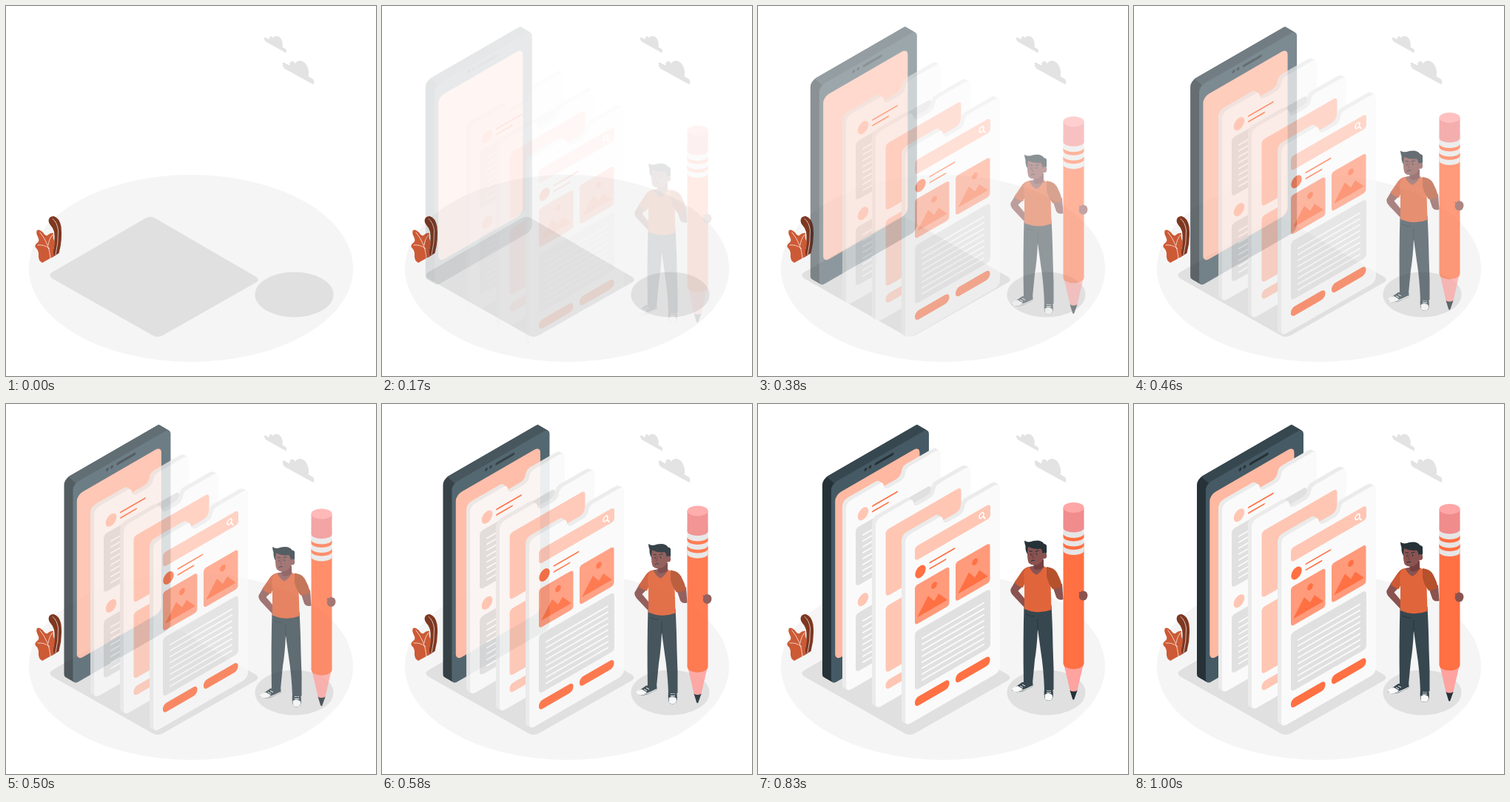
These frames come from a looping animation (500 by 500 pixels, 1.04 s). An HTML page:

```html
<!DOCTYPE html>
<html lang="en">
<head>
<meta charset="utf-8">
<title>Interface prototype</title>
<style>
html, body { margin: 0; width: 100%; height: 100%; overflow: hidden; background: #fff; }
svg { display: block; width: 100vw; height: 100vh; }
</style>
</head>
<body>
<svg viewBox="0 0 500 500">
  <defs>
    <path id="cloud" d="M374 79Q373 75 377 77L383 80.500Q383 74.500 387 74.500Q390 75 391 78Q392 74 398 74Q405 75 408 84Q410 91 408.500 95L415 99Q418 103 415 106L377 85Q374 83 374 79Z" fill="#e3e3e3"/>
  </defs>

  <ellipse cx="250" cy="354.500" rx="219" ry="126.500" fill="#f5f5f5"/>
  <path d="M62 360L189 286.500Q195 283 201 286.500L338 366Q343 370 338 373.500L212 445Q205 449 198 445L62 368Q57 364 62 360Z" fill="#e0e0e0"/>
  <ellipse cx="389.500" cy="390" rx="53" ry="30.500" fill="#e0e0e0"/>
  <use href="#cloud"/>
  <use href="#cloud" transform="translate(83.500 -12) scale(.71)"/>

  <g id="plant" fill="none" stroke="#fff" stroke-width=".7" stroke-linecap="round">
    <path stroke="none" fill="#7f3720" d="M57.500 290Q58 284 64.500 284Q72 286 74.500 298Q76.500 316 71.500 334L62 340Q67 318 65 305Q63 299 60 296Q57.500 293 57.500 290Z"/>
    <path d="M63 287.500Q69 292 70.500 303Q71 320 67 336"/>
    <path stroke="none" fill="#cc5a35" d="M49 347Q43 344 44 335Q44 330 40 326.500Q38 323 43 319.500Q46 317 43 312Q40 306 42 303Q45 301 50 306Q53 311 56 310Q60 306 64 307Q63 313 65 317Q67 321 64.500 327Q63 332 65 338Z"/>
    <path d="M60 341Q59 322 46 306M57 323Q58 315 63 309M59 328Q52 322 43 323"/>
  </g>

  <g id="phone"></g>
  <g id="cards"></g>

  <g id="person">
    <!-- pencil -->
    <path d="M412.500 350L422 391H431L440.500 350Z" fill="#ffa3a0"/>
    <path d="M421.500 389Q426 392 431.500 389L427.500 400.500Q426.300 403 425 400.500Z" fill="#263238"/>
    <path d="M412.500 190V353Q414 358 417 358Q419 359 421 359.500Q426.500 361 432 359.500Q435 359 437 357.500Q440 356 440.500 353V190Z" fill="#ff7043"/>
    <path d="M412.500 160V200A14 6 0 0 0 440.500 200V160Z" fill="#e6e6e6"/>
    <path d="M412.500 177V181.500A14 6 0 0 0 440.500 181.500V177A14 6 0 0 1 412.500 177ZM412.500 188.500V193A14 6 0 0 0 440.500 193V188.500A14 6 0 0 1 412.500 188.500Z" fill="#ff7043"/>
    <path d="M412.500 142V169.500A14 6 0 0 0 440.500 169.500V142Z" fill="#f08c8c"/>
    <ellipse cx="426.500" cy="142" rx="14" ry="7" fill="#ffa6a6"/>

    <!-- shoes and trousers -->
    <path d="M357 378L371 377Q372 382 371 384L358 390Q349 392.500 344 390Q342 387 347 385Z" fill="#37474f"/>
    <path d="M351 383Q343 385 343 388Q345 391 351 390.500Q356 389 358 387Z" fill="#fafafa"/>
    <path d="M344 390Q352 393 371 383" fill="none" stroke="#fafafa" stroke-width="1.200"/>
    <path d="M354 383L358 385M357 381L361 383" stroke="#fff" stroke-width="1"/>
    <path d="M387 386H398Q400 396 397.500 401Q392 405 388 401Q386 396 387 386Z" fill="#37474f"/>
    <path d="M387.500 395Q392 391 397.500 395Q399 400 396 402Q391 404 388 401Z" fill="#fafafa"/>
    <path d="M390 389H396M390 392H396" stroke="#fff" stroke-width="1"/>
    <path d="M359.500 274H396.500Q398 300 398.500 330Q400 360 399.500 388Q394 390 387 388Q386 360 382 335L378 306Q377 330 374 348L371 379Q365 381 359 379Q358 325 359.500 274Z" fill="#37474f"/>
    <path d="M378 292Q378 300 378 308M362 286Q367 289 374 289" fill="none" stroke="#263238" stroke-width=".8"/>

    <!-- arms -->
    <path d="M348 241L341.500 252Q340.500 256 344 260L358 275Q361 278 363 273L362 267L351.500 254.500L359 247Z" fill="#8a5350"/>
    <path d="M398 248L411 245L412.500 266Q406 268 403 263Z" fill="#8a5350"/>
    <path d="M433.500 255.500Q436 257 438 254.500Q445 254 445.500 260.500Q445 267 439.500 267.500Q434 267 433.500 261Q435 259 433.500 255.500Z" fill="#8a5350"/>

    <!-- shirt -->
    <path d="M366 222Q360 223 356 229L346.500 243Q350 248 358 250L364 236Z" fill="#cc5a35"/>
    <path d="M366 222Q360 224 359 232L360 247V279Q378 287 396.500 280L395 226L386 221Z" fill="#e1653a"/>
    <path d="M390 222Q400 223 404 230Q409 239 411 248Q406 252 398 252Q392 244 390 235Z" fill="#b5512d"/>
    <path d="M366.500 222Q370 230 376.500 233Q384 228 386.500 221L380 219Z" fill="#8a5350"/>

    <!-- head -->
    <path d="M372 212H386L386 223Q379 228 373 225Z" fill="#753f40"/>
    <path d="M364 194H387V208Q384 216 378 219Q370 221 366 217Q364 213 364 205Z" fill="#8a5350"/>
    <path d="M360 186.500Q365 190 372 187Q383 185 386.500 191Q391 191 390 197Q391 202 388.500 207L384.500 206Q385 201 382 197.500Q373 199 365 195Q364 200 364 205Q361 200 361.500 194Q360 190 360 186.500Z" fill="#263238"/>
    <ellipse cx="387" cy="207" rx="3.200" ry="4" fill="#8a5350"/>
    <path d="M366.500 200.500L371 201.500M374.500 201.500L379.500 200M369 204V206.500M376.500 203.500V206M369 214.500Q371 212.500 374 213.500" fill="none" stroke="#263238" stroke-width="1.100"/>
    <path d="M372.500 203Q371 207 370.500 209.500H373" fill="none" stroke="#6a393a" stroke-width=".8"/>
  </g>
</svg>

<script>
const ORANGE = '#ff7043', PEACH = '#ffc6b4', SCREEN = '#ffb8a1', GREY = '#e0e0e0', WHITE = '#fafafa';
const CYCLE = 1040, FPS = 24, SHIFT = 30;
const $ = id => document.getElementById(id);

// Upright panels use a plane whose x axis climbs to the right at 30 degrees.
const plane = (x, y, body) => `<g transform="matrix(1 -.577 0 1 ${x} ${y})">${body}</g>`;
const rect = (x, y, w, h, r, fill) =>
  `<rect x="${x}" y="${y}" width="${w}" height="${h}" rx="${r}" fill="${fill}"/>`;
const disc = (x, y, r, fill) =>
  `<ellipse cx="${x}" cy="${y}" rx="${r}" ry="${r * 1.1}" fill="${fill}"/>`;
const line = (x, y, w, color, size) =>
  `<path d="M${x} ${y}h${w}" stroke="${color}" stroke-width="${size}" stroke-linecap="round"/>`;
const repeat = (n, draw) => Array.from({ length: n }, (_, i) => draw(i)).join('');

// Stacks copies of a face backwards to give it thickness.
const extrude = (x, y, depth, body) =>
  repeat(depth, i => plane(x - (depth - i), y - (depth - i) * .58, body));

const textBlock = (y, h) => rect(13, y, 102, h, 5, GREY) +
  repeat(8, i => line(23, y + 14.5 + i * 8, 83, WHITE, 2.2));

const button = (x, fill) => rect(x, 225.8, 46.5, 12.4, 5.5, fill);

const picture = x => `<g transform="translate(${x} 74)">` +
  rect(0, 0, 46.5, 53, 4, '#ff9a7b') + disc(26, 14, 3.8, ORANGE) +
  `<path d="M4 43.500L18 24.500L26 36L32 29.500L43 43.500Z" fill="${ORANGE}" stroke="${ORANGE}" stroke-linejoin="round"/></g>`;

const cardShape = fill => `<path fill="${fill}" d="M8 0H45Q50 0 51 6Q52 13 59 13H72Q79 13 80 6Q81 0 86 0
  H120Q128 0 128 8V248Q128 256 120 256H8Q0 256 0 248V8Q0 0 8 0Z"/>`;

const card = (step, content) => {
  const x = 199 - step * 40, y = 181.5 - step * 23;
  return extrude(x, y, 5, cardShape('#ebebeb')) + plane(x, y, cardShape(WHITE) + content);
};

const profile = y => disc(23, y + 28, 7.3, PEACH) + textBlock(y + 42, 79);
const profileCard = profile(0) + profile(116) +
  line(36, 25, 33, ORANGE, 1.9) + line(36, 32.5, 21, ORANGE, 1.9);

const bannerCard = rect(13.5, 22, 102, 90, 5, PEACH) + rect(13.5, 125, 102, 90, 5, PEACH) +
  button(13.5, PEACH);

const mainCard = rect(13, 21.3, 102, 19.2, 4.5, PEACH) +
  '<g fill="none" stroke="#fff" stroke-width="1.6" stroke-linecap="round"><ellipse cx="103" cy="30.500" rx="3" ry="3.400"/><path d="M105.500 33.500L108 37.500"/></g>' +
  disc(20.5, 58.8, 7.2, ORANGE) + line(33.5, 54, 33, ORANGE, 1.9) + line(33.5, 62, 21, ORANGE, 1.9) +
  picture(13) + picture(68) + textBlock(136, 79.5) +
  button(13, ORANGE) + button(68, ORANGE);

$('cards').innerHTML = card(2, profileCard) + card(1, bannerCard) + card(0, mainCard);

const body = fill => rect(0, 0, 132, 271, 7.5, fill);
$('phone').innerHTML = extrude(97, 108.6, 12, body('#263238')) +
  plane(97, 108.6,
    '<path d="M4 1H128L116 -13.900H-6Z" fill="#37474f"/>' + body('#455a64') +
    rect(5.3, 17.5, 114.2, 223.5, 8, SCREEN) +
    disc(46.5, 6.7, 1.9, '#263238') + disc(52.5, 6.7, 1.9, '#263238') +
    line(60.5, 7, 22.5, '#263238', 3.6));

// Cubic Bezier easing with a slight overshoot.
const bezier = (a, b, s) => 3 * (1 - s) ** 2 * s * a + 3 * (1 - s) * s * s * b + s ** 3;
function ease(p) {
  if (p >= 1) return 1;
  let lo = 0, hi = 1;
  for (let i = 0; i < 30; i++) {
    const mid = (lo + hi) / 2;
    if (bezier(.36, .5, mid) < p) lo = mid; else hi = mid;
  }
  return bezier(-.01, 1.38, lo);
}

function draw() {
  const time = Math.floor(performance.now() % CYCLE / 10) * 10;
  const tick = Math.floor((time + 5) * FPS / 1000);
  const p = ease((tick + .5) / FPS);
  const offset = SHIFT * (1 - p);
  const place = (id, x, y) => {
    $(id).setAttribute('transform', `translate(${x} ${y})`);
    $(id).setAttribute('opacity', Math.min(1, Math.max(0, p)));
  };
  place('phone', -offset, 0);
  place('cards', 0, offset);
  place('person', 0, offset);
  requestAnimationFrame(draw);
}
draw();
</script>
</body>
</html>
```
